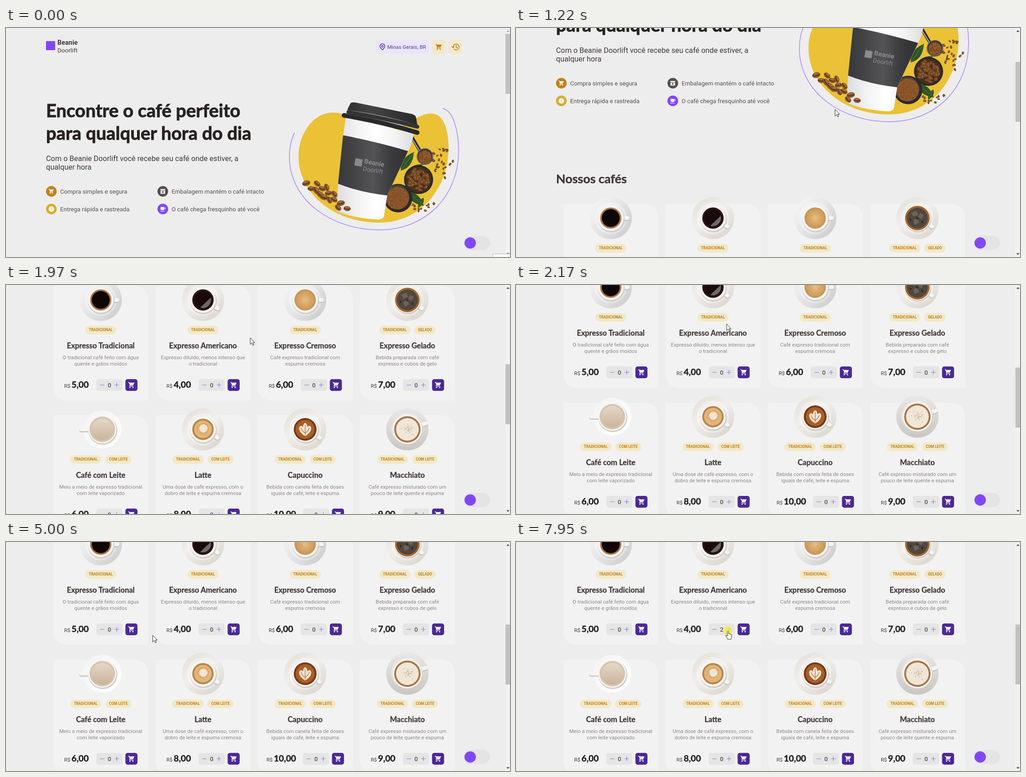
These frames come from a looping animation (1108 px wide and 506 px high, 8000 ms). An HTML page:

```html
<!DOCTYPE html>
<html lang="pt">
<head>
<meta charset="utf-8">
<title>Cafés</title>
<style>
html, body { margin: 0; width: 100%; height: 100%; overflow: hidden; background: #ededed; }
svg { display: block; width: 1108px; height: 506px; font-family: Roboto, sans-serif; }
.hero, .section, .name, .price { font-family: Lato, sans-serif; font-weight: 700; stroke-width: .5; }
.hero { font-size: 39.9px; fill: #272221; stroke: #272221; stroke-width: .9; }
.section { font-size: 27px; fill: #403937; stroke: #403937; }
.name { font-size: 16.5px; fill: #403937; stroke: #403937; stroke-width: .3; }
.price { font-size: 19.2px; fill: #272221; stroke: #272221; }
.lead { font-size: 16.3px; fill: #403937; }
.feature { font-size: 13.05px; fill: #574f4d; }
.place { font-size: 11.4px; fill: #4f3d97; }
.desc { font-size: 11.4px; fill: #8d8686; }
.tag { font-size: 8.15px; font-weight: 700; fill: #c47f17; }
.currency { font-size: 11.4px; fill: #403937; }
.qty { font-size: 13px; fill: #272221; }
.brand { font-size: 14.5px; font-weight: 700; }
.brand2 { font-size: 13.5px; }
.tip { font: 9.25px "Open Sans", sans-serif; fill: #fff; }
.mid { text-anchor: middle; }
</style>
</head>
<body>
<svg id="stage" viewBox="0 0 1108 506"></svg>
<script>
let seed = 7;
const rnd = () => (seed = (seed * 16807) % 2147483647) / 2147483647;

const text = (x, y, cls, s, extra = '') => `<text x="${x}" y="${y}" class="${cls}" ${extra}>${s}</text>`;
const rect = (x, y, w, h, fill, r = 0, extra = '') =>
  `<rect x="${x}" y="${y}" width="${w}" height="${h}" rx="${r}" fill="${fill}" ${extra}/>`;
const disc = (x, y, r, fill, extra = '') => `<circle cx="${x}" cy="${y}" r="${r}" fill="${fill}" ${extra}/>`;
const shape = (d, fill, extra = '') => `<path d="${d}" fill="${fill}" ${extra}/>`;
const line = (d, color, w = 1) =>
  `<path d="${d}" fill="none" stroke="${color}" stroke-width="${w}" stroke-linecap="round" stroke-linejoin="round"/>`;
const at = (x, y, body, more = '') => `<g transform="translate(${x} ${y}) ${more}">${body}</g>`;
const cart = (x, y, color, s = .66) => at(x, y,
  shape('M-11-10h3.5l1 2H10L5.6 1H-4l-1 2H7v2H-7V2.5L-5.6 0-9-8h-2z', color) +
  disc(-5, 8, 2, color) + disc(5, 8, 2, color), `scale(${s})`);
const gradient = (id, stops, dir = '', kind = 'linear') =>
  `<${kind}Gradient id="${id}" ${dir}>${stops.map((c, i) =>
    `<stop offset="${i / (stops.length - 1)}" stop-color="${c}"/>`).join('')}</${kind}Gradient>`;

const bean = (x, y, r, angle) => at(x, y,
  `<ellipse rx="${r}" ry="${r * .66}" fill="#8f5c30" stroke="#53301a" stroke-width=".5"/>` +
  line(`M${-r * .4} ${-r * .35}H${r * .35}`, '#bb8a58', r * .14) +
  line(`M${-r * .8} 0Q0 ${r * .4} ${r * .8} 0`, '#3f2312', r * .16), `rotate(${angle})`);

// Random beans spread over an ellipse
const scatter = (n, cx, cy, rx, ry, size) => Array.from({ length: n }, () => {
  const a = rnd() * 6.283, d = Math.sqrt(rnd());
  return bean(cx + rx * d * Math.cos(a), cy + ry * d * Math.sin(a), size * (.75 + rnd() * .4), rnd() * 180);
}).join('');

const grounds = (cx, cy, r) => disc(cx, cy, r, '#8a5429') + Array.from({ length: 70 }, () => {
  const a = rnd() * 6.283, d = r * Math.sqrt(rnd());
  return disc(cx + d * Math.cos(a), cy + d * Math.sin(a), 1, rnd() < .5 ? '#6b3c1c' : '#a2683a');
}).join('');

const leaf = (x, y, angle, len) => at(x, y,
  shape(`M0 0Q${len * .4} ${-len * .36} ${len} 0Q${len * .4} ${len * .36} 0 0`, '#2f5426') +
  line(`M2 0H${len - 3}`, '#5f8746', .8), `rotate(${angle})`);

function header() {
  return rect(88, 29, 20, 20, '#8047f8') +
    text(113, 37, 'brand', 'Beanie', 'fill="#403937"') + text(113, 53.5, 'brand2', 'Doorlift', 'fill="#403937"') +
    rect(813, 26.5, 117, 30.5, '#ebe5f9', 5) + text(838, 46, 'place', 'Minas Gerais, BR') +
    line('M827.5 48.5C824 45 822 42.5 822 40.5a5.5 5.5 0 0 1 11 0C833 42.5 831 45 827.5 48.5Z', '#4b2995', 1.5) +
    line('M827.5 38.7a1.9 1.9 0 1 0 .01 0', '#4b2995', 1.3) +
    rect(936, 26.5, 31, 30.5, '#f1e9c9', 5) + cart(951.5, 42, '#c47f17') +
    rect(973, 26.5, 30, 30.5, '#f1e9c9', 5) +
    line('M983 42a6.6 6.6 0 1 1 2.2 4.9M989.5 38v4.3l3 1.8', '#c47f17', 1.6) +
    shape('M979.5 41h6.5l-3.2 4z', '#c47f17');
}

function feature(x, y, color, label, glyph) {
  return disc(x, y, 11.7, color) + glyph(x, y) + text(x + 19.4, y + 4.6, 'feature', label);
}

function intro() {
  const boxGlyph = (x, y) => at(x, y,
    rect(-5.5, -5, 11, 2.6, '#fff', 1) + rect(-5, -1.6, 10, 6.8, '#fff', 1) + shape('M-1-.8h2v2h1.5L0 4-2.5 1.2H-1z', '#574f4d'));
  const clockGlyph = (x, y) => disc(x, y, 6, '#fff') + line(`M${x} ${y - 3.5}v3.7l2.4 1.5`, '#dbac2c', 1.1);
  const cupGlyph = (x, y) => at(x, y,
    shape('M-5-4.5H3V0Q3 2.5 0 2.5H-2Q-5 2.5-5 0z', '#fff') + line('M3-3h1.5q1 0 1 1.5t-1 1.5H3M-5 5H4', '#fff', 1.2));
  return text(88, 197, 'hero', 'Encontre o café perfeito') +
    text(88, 247, 'hero', 'para qualquer hora do dia') +
    text(88, 293.5, 'lead', 'Com o Beanie Doorlift você recebe seu café onde estiver, a') +
    text(88, 313, 'lead', 'qualquer hora') +
    feature(99.7, 361, '#c47f17', 'Compra simples e segura', (x, y) => cart(x, y, '#fff', .54)) +
    feature(344.7, 361, '#574f4d', 'Embalagem mantém o café intacto', boxGlyph) +
    feature(99.7, 400, '#dbac2c', 'Entrega rápida e rastreada', clockGlyph) +
    feature(344.7, 400, '#8047f8', 'O café chega fresquinho até você', cupGlyph) +
    text(88, 582, 'section', 'Nossos cafés');
}

function heroArt() {
  const spilled = [[660, 343], [684, 344], [671, 355], [682, 359], [695, 355], [705, 352], [691, 368], [709, 365],
    [722, 367], [699, 374], [711, 380], [721, 379], [736, 387], [730, 397], [750, 399]];
  return shape('M643 283C643 235 675 187 718 187C765 187 780 225 830 225C880 225 900 189 935 189' +
      'C962 189 973 225 973 265C973 350 915 430 820 430C720 430 643 365 643 283Z', '#ebc136') +
    line('M634 232C626 248 623 266 623 285C623 380 715 446 820 446C925 446 995 370 995 272C995 230 984 183 961 178', '#b596f3', 1.8) +
    scatter(26, 958, 302, 28, 36, 3.2) + scatter(14, 918, 396, 30, 16, 2.8) +
    leaf(868, 315, -55, 50) + leaf(880, 322, -30, 42) + leaf(882, 362, 40, 48) + leaf(918, 375, 118, 26) +
    line('M893 242L911 273', '#2a2a2a', 7) + line('M894 247L909 271', '#b9b9b9', 2) +
    disc(921, 284, 18, '#3c3a39') + disc(921, 283, 17, 'none', 'stroke="#8d8a86"') + grounds(921, 285, 14) +
    disc(862, 376, 31.5, '#2b2a2a') + disc(860, 374, 27, '#474443') + grounds(861, 376, 25) +
    disc(907, 335, 32, '#2b2a2a') + disc(907, 335, 28, '#4a2e1c') + scatter(75, 907, 335, 24, 24, 4.3) +
    shape('M747 198L897 233Q891 260 884 273L838 370L831 416Q828 424 815 423Q762 420 727 404L730 344L741 237Z', 'url(#paper)') +
    shape('M741 237Q810 250 884 272L838 370Q780 364 730 344Z', 'url(#sleeve)') +
    line('M743 193Q827 207 904 231', '#29292a', 10) + line('M753 186Q832 199 904 218', '#343435', 9) +
    shape('M757 167Q759 163 770 165L892 190Q901 192 902 200L904 214Q830 192 750 181Z', 'url(#lid)') +
    line('M746 190Q827 202 902 226', '#454546', 1) +
    at(775, 297, rect(-8, -8, 16, 16, '#8b8b8c') + text(12, 0, 'brand', 'Beanie', 'fill="#8b8b8c"') +
      text(12, 16, 'brand2', 'Doorlift', 'fill="#8b8b8c"'), 'rotate(10)') +
    spilled.map(([x, y], i) => bean(x, y, i % 3 ? 7.7 : 8.7, i * 53 % 90 - 15)).join('');
}

function coffee(x, y, c) {
  const { plate, plateR = 46.5, r = 28.5, brewR = 23.5, angle = 30, reach = 37, ring, fill, art = '' } = c;
  const a = angle * Math.PI / 180, hx = reach * Math.cos(a), hy = reach * Math.sin(a);
  return at(x, y, disc(0, 0, plateR, `url(#${plate})`) +
    disc(0, 0, plateR * .76, '#fff', 'opacity=".3"') +
    line(`M0 2L${hx} ${hy + 2}`, '#c9c6c2', 9) + line(`M0 0L${hx} ${hy}`, '#f6f5f3', 8) +
    disc(1, 2, r + 1, '#cfccc8') + disc(0, 0, r, '#f5f4f2') +
    disc(0, 0, brewR, ring) + disc(0, 0, brewR - 4, fill) + art);
}

const foam = line('M-13 3Q-12-14 4-13Q15-9 10 3Q3 13-6 7Q-9-5 2-5', '#d9a76a', 2.5) + disc(1, -2, 9, '#f3e4cf');
const rosette = shape('M0 15Q-15 6-13-5Q-9-11-5-5Q-4-14 0-14Q4-14 5-5Q9-11 13-5Q15 6 0 15Z', '#f3e3cf') +
  line('M0 13V-10M-9-3Q-6 5 0 8Q6 5 9-3', '#b56a2e', 1.2);
const ice = shape('M-14-11L-3-16L2-7L-8-3ZM6-12L14-6L9 2L2-2ZM-9 4L0 1L4 10L-6 15Z', '#81766b', 'opacity=".6"') +
  shape('M-4-2l6 1-2 5zM8 7l6-2-3 8zM-17 1l5 2-4 5z', '#2f2a26');
const shine = shape('M17-5A18 18 0 0 1-6 17Z', '#858083', 'opacity=".8"');
const speckles = Array.from({ length: 40 }, () =>
  disc((rnd() + rnd() - 1) * 14, (rnd() + rnd() - 1) * 14, .8, '#c4a57f')).join('');

const TRAD = 'TRADICIONAL', MILK = 'COM LEITE';
const products = [
  { name: 'Expresso Tradicional', desc: ['O tradicional café feito com água', 'quente e grãos moídos'], price: '5,00', tags: [TRAD],
    cup: { plate: 'gray', angle: 0, ring: 'url(#crema)', fill: '#0e0705' } },
  { name: 'Expresso Americano', desc: ['Expresso diluído, menos intenso que', 'o tradicional'], price: '4,00', tags: [TRAD],
    cup: { plate: 'cream', ring: '#2a1412', fill: '#1a0a0b', art: shine } },
  { name: 'Expresso Cremoso', desc: ['Café expresso tradicional com', 'espuma cremosa'], price: '6,00', tags: [TRAD],
    cup: { plate: 'gray', angle: 0, ring: '#c9965a', fill: 'url(#froth)' } },
  { name: 'Expresso Gelado', desc: ['Bebida preparada com café', 'expresso e cubos de gelo'], price: '7,00', tags: [TRAD, 'GELADO'],
    cup: { plate: 'cream', brewR: 27, ring: '#a4642a', fill: '#51473f', art: ice } },
  { name: 'Café com Leite', desc: ['Meio a meio de expresso tradicional', 'com leite vaporizado'], price: '6,00', tags: [TRAD, MILK],
    cup: { plate: 'white', plateR: 42, r: 31, brewR: 28, angle: 180, reach: 46, ring: '#d6c3ad', fill: 'url(#milk)', dx: 3.5 } },
  { name: 'Latte', desc: ['Uma dose de café expresso, com o', 'dobro de leite e espuma cremosa'], price: '8,00', tags: [TRAD, MILK],
    cup: { plate: 'cream', ring: '#bd823f', fill: '#dfb680', art: foam } },
  { name: 'Capuccino', desc: ['Bebida com canela feita de doses', 'iguais de café, leite e espuma'], price: '10,00', tags: [TRAD, MILK],
    cup: { plate: 'cream', brewR: 25, ring: '#743814', fill: '#a85e28', art: rosette } },
  { name: 'Macchiato', desc: ['Café expresso misturado com um', 'pouco de leite quente e espuma'], price: '9,00', tags: [TRAD, MILK],
    cup: { plate: 'silver', r: 32.5, brewR: 29, angle: -18, reach: 43, ring: '#a87343', fill: '#efe6d8', art: speckles } },
];

function tags(cx, y, labels) {
  const widths = { [TRAD]: 69, [MILK]: 57.5, GELADO: 47 };
  let x = cx - (labels.reduce((sum, s) => sum + widths[s], 0) + 8.5 * (labels.length - 1)) / 2;
  return labels.map(s => {
    const w = widths[s], pill = rect(x, y, w, 19, '#f1e9c9', 9.5) + text(x + w / 2, y + 12.4, 'tag mid', s);
    x += w + 8.5;
    return pill;
  }).join('');
}

function card(p, i) {
  const x = 104 + (i % 4) * 224.7, y = i < 4 ? 628 : 914, cx = x + 104.3;
  const wide = p.price.length > 4 ? 4.7 : 0, box = cx - 9.8 + wide, sum = box - 70.5 - wide * 2, row = y + 219;
  return shape(`M${x + 4} ${y}h176a29 29 0 0 1 29 29v220a4 4 0 0 1-4 4h-176a29 29 0 0 1-29-29V${y + 4}a4 4 0 0 1 4-4`, '#f3f2f2') +
    coffee(cx + (p.cup.dx || 0), y + 31, p.cup) +
    tags(cx, y + 88, p.tags) +
    text(cx, y + 137.5, 'name mid', p.name) +
    p.desc.map((s, k) => text(cx, y + 162 + 14 * k, 'desc mid', s)).join('') +
    text(sum, y + 225, 'currency', 'R$') + text(sum + 16, y + 225, 'price', p.price) +
    rect(box, row - 13, 57.5, 26, '#e6e5e5', 5) +
    line(`M${box + 8.5} ${row}h9M${box + 40.5} ${row}h9m-4.5-4.5v9`, '#8072e4', 1) +
    text(box + 29, row + 4.7, 'qty mid', '0', `id="qty${i}"`) +
    rect(box + 64, row - 13, 26.5, 26, '#4b2995', 5) + cart(box + 77.3, row, '#fff');
}

const cursors =
  `<g id="arrow">${shape('M0 0V14.5L3.4 11.3L5.8 16.5L8 15.5L5.7 10.5H10Z', '#fff', 'stroke="#111" stroke-width=".9"')}</g>` +
  `<g id="blocked">${disc(0, 0, 5.6, '#fff', 'stroke="#d3141c" stroke-width="2.2"')}${line('M-3.8-3.8L3.8 3.8', '#d3141c', 2.2)}</g>` +
  `<g id="hand">${shape('M-1.5 1Q0-1.5 1.5 1V6Q3 4.8 4 6.4Q5.5 5.5 6 7Q8 6.5 8 9V13L6.5 18H-.5L-1.5 15L-5.5 10.5Q-5 8-2.5 10L-1.5 11Z',
    '#fff', 'stroke="#111" stroke-width=".9"')}</g>`;

const stage = document.getElementById('stage');
stage.innerHTML = '<defs>' +
  gradient('gray', ['#f8f8f8', '#e6e6e7', '#cdcdcf'], 'x2="1" y2=".8"') +
  gradient('cream', ['#e2ded7', '#f1efeb', '#dcd8d1'], 'x2=".7" y2="1"') +
  gradient('silver', ['#e9e8e6', '#c9c6c2'], 'x2="0" y2="1"') +
  gradient('white', ['#f3f3f3', '#fff'], 'x2="1" y2="1"') +
  gradient('milk', ['#e5d8c8', '#cbb39a'], 'x2="0" y2="1"') +
  gradient('crema', ['#2a1208', '#2a1208', '#2a1208', '#6e3c1a', '#c69062'], '', 'radial') +
  gradient('froth', ['#e6bf86', '#d9ab6c', '#cf9c5c'], '', 'radial') +
  gradient('paper', ['#dcdcdc', '#f2f2f2', '#fff', '#f4f4f4', '#dcdcdc']) +
  gradient('sleeve', ['#38383a', '#454547', '#545456', '#3b3b3d', '#303032']) +
  gradient('lid', ['#2f2f30', '#434344', '#363637', '#2a2a2b']) + '</defs>' +
  rect(0, 0, 1108, 506, '#ededed') +
  `<g id="page">${header()}${intro()}${heroArt()}${products.map(card).join('')}</g>` +
  rect(1006, 459.5, 58, 31, '#e4e4e4', 15.5) + disc(1020.5, 475, 12.5, '#8047f8') +
  rect(1097, 0, 11, 506, '#f1f1f1') + rect(1098, 13, 10, 132.5, '#c1c1c1', 0, 'id="thumb"') +
  shape('M1100 8.5h7l-3.5-4z', '#505050', 'id="up"') + shape('M1100 497.5h7l-3.5 4z', '#505050') +
  rect(1070, 499, 40, 9, '#f8f8f8', 0, 'id="status" stroke="#b5b5b5"') +
  `<g id="tip">${rect(.5, 201.5, 242.5, 18.5, '#2b2b2b', 0, 'stroke="#444"')}` +
  `${text(6, 214.3, 'tip', 'Selecione uma quantidade para adicionar ao carrinho')}</g>` +
  disc(465, 196, 10, '#f4ee35', 'id="click" opacity=".75"') + cursors;

const el = id => document.getElementById(id);
const show = (id, on) => el(id).setAttribute('visibility', on ? 'visible' : 'hidden');
const move = (id, x, y) => el(id).setAttribute('transform', `translate(${x} ${y})`);

// Linear interpolation over rows of [time, value, ...]
function track(keys, t) {
  const i = keys.findIndex(k => k[0] > t);
  if (i === 0) return keys[0].slice(1);
  if (i < 0) return keys[keys.length - 1].slice(1);
  const a = keys[i - 1], b = keys[i], f = (t - a[0]) / (b[0] - a[0]);
  return a.slice(1).map((v, k) => v + (b[k + 1] - v) * f);
}
const scrollKeys = [[890, 0], [1220, 238], [1620, 479], [1690, 490], [2030, 654]];
const mouseKeys = [[270, 884, 464], [680, 704, 182], [1220, 701.5, 180], [1620, 667.5, 171], [2170, 463, 86], [2300, 463, 86],
  [2510, 323, 68], [3060, 275, 188], [4860, 275, 188], [5230, 400, 236], [5550, 503, 188], [6870, 503, 188], [7250, 466, 197]];
const within = (t, a, b) => t >= a && t < b;

function draw(t) {
  const scroll = Math.round(track(scrollKeys, t)[0]), [x, y] = track(mouseKeys, t);
  move('page', 0, -scroll);
  el('thumb').setAttribute('y', 13 + scroll * .259);
  el('up').setAttribute('fill', scroll ? '#505050' : '#a3a3a3');
  show('status', t < 70);

  const settled = scroll === 654, overRow = settled && within(y, 180, 206);
  const kind = overRow && (within(x, 262, 289) || within(x, 488, 515)) ? 'blocked'
    : overRow && within(x, 461, 477) ? 'hand' : 'arrow';
  for (const id of ['arrow', 'blocked', 'hand']) {
    show(id, t >= 270 && id === kind);
    move(id, x, y);
  }

  show('tip', within(t, 3660, 4930) || within(t, 6070, 6930));
  move('tip', t < 5500 ? 284 : 513, 0);
  show('click', within(t, 7330, 7480) || within(t, 7620, 7750) || t >= 7950);
  el('qty1').textContent = t < 7480 ? 0 : t < 7750 ? 1 : 2;
}

const start = performance.now();
function frame() {
  draw((performance.now() - start) % 8000);
  requestAnimationFrame(frame);
}
frame();
</script>
</body>
</html>
```
